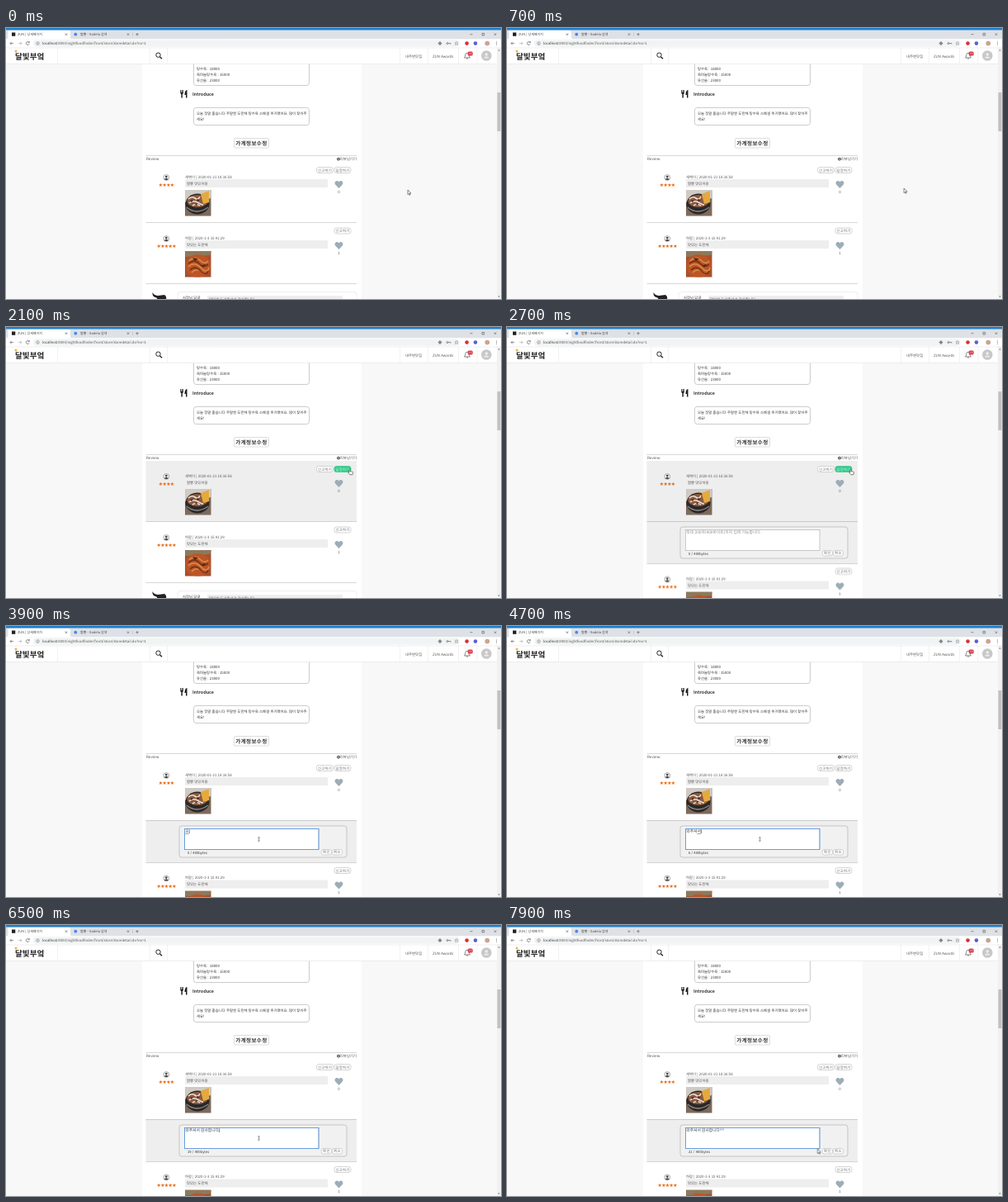
Recreate the animation shown at these times as an HTML page. Size 600x328 px, loop 8 s.

```html
<!DOCTYPE html>
<html lang="ko">
<head>
<meta charset="utf-8">
<title>상세페이지</title>
<style>
html, body { margin: 0; width: 100%; height: 100%; overflow: hidden; background: #fff; }
svg { display: block; width: 100vw; height: 100vh; }
text { font: 4.4px "Noto Sans CJK KR", "Noto Sans CJK", "Noto Sans", sans-serif; fill: #555; text-rendering: geometricPrecision; white-space: pre; }
.dark { fill: #333; }
.mid { text-anchor: middle; }
.tab { font-size: 4px; fill: #444; }
.label { text-anchor: middle; letter-spacing: .25px; fill: #666; }
.logo { font-size: 9.6px; font-weight: 700; fill: #222; }
.star { font: 6px "DejaVu Sans", sans-serif; letter-spacing: -.7px; fill: #e8670c; text-anchor: middle; }
.line { fill: none; stroke: #b0b0b0; stroke-width: .5; }
.box { fill: #fff; stroke: #999; stroke-width: .5; }
.icon { fill: none; stroke: #5f6368; stroke-width: .7; }

.hover, .press, .form, .focus, .tail, .pointer, .arrow, .hand, .beam {
  animation: 8s step-end infinite;
}
.hover { animation-name: hover; }
.press { animation-name: press; }
.form { animation-name: form; }
.focus { animation-name: focus; }
.tail { animation-name: tail; }
.arrow { animation-name: arrow; }
.hand { animation-name: press; }
.beam { animation-name: beam; }
.pointer { animation-name: move; animation-timing-function: ease-in-out; }
@keyframes hover { 0%, 40.3%, 100% { opacity: 0 } 21.2% { opacity: 1 } }
@keyframes press { 0%, 36.6%, 100% { opacity: 0 } 24% { opacity: 1 } }
@keyframes form { 0% { opacity: 0 } 32%, 100% { opacity: 1 } }
@keyframes focus { 0% { opacity: 0 } 44.5%, 100% { opacity: 1 } }
@keyframes tail { 0% { transform: none } 32%, 100% { transform: translateY(50.5px) } }
@keyframes arrow { 0%, 36.6%, 97%, 100% { opacity: 1 } 24%, 42% { opacity: 0 } }
@keyframes beam { 0%, 97%, 100% { opacity: 0 } 42% { opacity: 1 } }
@keyframes move {
  0%, 6% { transform: translate(487px, 196px) }
  17.5% { transform: translate(438px, 179px) }
  25%, 35.5% { transform: translate(416px, 172px) }
  44%, 91.25% { transform: translate(306.5px, 258px) }
  98.5%, 100% { transform: translate(376.5px, 271px) }
}
</style>
</head>
<body>
<svg viewBox="0 0 600 328" preserveAspectRatio="none">
  <defs>
    <g id="person">
      <circle r="3.4" fill="#fff" stroke="#555" stroke-width=".5"/>
      <circle cy="-.9" r="1.4" fill="#444"/>
      <path d="M-2.5 2.2Q-2 .7 0 .7T2.5 2.2Q0 3.8 -2.5 2.2Z" fill="#444"/>
    </g>
    <path id="heart" d="M0 4.6L-4.1 .5C-6 -1.7 -4.4 -4.2 -2.3 -4.2Q-.8 -4.2 0 -2.8Q.8 -4.2 2.3 -4.2C4.4 -4.2 6 -1.7 4.1 .5Z" fill="#9dadb6"/>
    <rect id="pill" width="20" height="7" rx="2.6" class="box" style="stroke:#aaa"/>
    <rect id="key" width="12" height="6.5" rx="2" class="box" style="stroke:#aaa"/>
    <path id="close" d="M-1.2 -1.2L1.2 1.2M1.2 -1.2L-1.2 1.2" class="icon"/>
    <clipPath id="photo"><rect width="31.5" height="31.5"/></clipPath>
  </defs>

  <!-- page -->
  <rect width="600" height="328" fill="#f8f8f8"/>
  <rect x="165" y="43" width="266" height="285" fill="#fff"/>

  <rect x="227.5" y="30" width="140" height="39.5" rx="3" class="box"/>
  <text class="dark" x="231" y="50.5">탕수육 : 18000</text>
  <text class="dark" x="231" y="57.5">육마늘탕수육 : 15000</text>
  <text class="dark" x="231" y="64.5">유산슬 : 23000</text>
  <g fill="#222">
    <path d="M211.3 75h.8v2.8h.6V75h.8v2.8h.6V75h.8v3.4q0 1.2-1 1.5v4.6h-1.5v-4.6q-1.1-.3-1.1-1.5Z"/>
    <path d="M219.5 75v9.5H218v-3.6h-1.5Q216.5 75.6 219.5 75Z"/>
  </g>
  <text class="dark" x="226" y="82" style="font-size:5.4px;font-weight:700">Introduce</text>
  <rect x="227.5" y="96.5" width="140" height="21" rx="3" class="box"/>
  <text class="dark" x="231" y="105.3">오늘 정말 춥습니다 주말엔 도란채 탕수육 스페셜 추가했어요. 많이 찾아주</text>
  <text class="dark" x="231" y="112.3">세요!</text>
  <rect x="276.5" y="133.5" width="42" height="11.5" rx="1" class="box" style="stroke:#bbb"/>
  <text class="dark mid" x="297.4" y="141.7" style="font-size:6.6px;font-weight:700;letter-spacing:.3px">가계정보수정</text>

  <path d="M169.5 154.5H425" class="line"/>
  <text x="170" y="160.2" style="font-size:4.6px">Review</text>
  <circle cx="403" cy="158.6" r="1.9" fill="#444"/>
  <path d="M402 158.600h2M403 157.600v2" stroke="#fff" stroke-width=".5"/>
  <text x="425" y="160.2" text-anchor="end">리뷰남기기</text>

  <!-- first review -->
  <rect class="hover" x="169.5" y="162" width="255.5" height="73.500" fill="#eee"/>
  <use href="#pill" x="376.5" y="168.5"/>
  <text class="label" x="386.6" y="173.6">신고하기</text>
  <use href="#pill" x="398" y="168.5"/>
  <text class="label" x="408.1" y="173.6">답장하기</text>
  <g class="press">
    <rect x="398" y="168.5" width="20" height="7" rx="2.6" fill="#2fcb8b" stroke="#2fcb8b" stroke-width=".5"/>
    <text class="label" x="408.1" y="173.6" style="fill:#d5f7e8">답장하기</text>
  </g>
  <use href="#person" x="194.3" y="181"/>
  <text class="star" x="194.2" y="192.1">★★★★</text>
  <text x="217" y="181.7">새벽이 | 2020-01-21 18:16:58</text>
  <rect x="217" y="183" width="173" height="10" fill="#eee"/>
  <text x="219" y="189.7">짬뽕 맛있어용</text>
  <g transform="translate(217 196)" clip-path="url(#photo)">
    <rect width="32" height="32" fill="#7d6a5c"/>
    <path d="M0 0H32V10L0 15Z" fill="#cfcac4"/>
    <ellipse cx="15" cy="17" rx="14.5" ry="12.5" fill="#2b2827"/>
    <ellipse cx="15" cy="13.5" rx="12.5" ry="7.500" fill="#8d5a40"/>
    <path d="M19 5L29 1V15L22 17Z" fill="#e5aa3d"/>
    <path d="M4 11Q8 7 12 10T18 8M5 16Q10 12 15 15T22 18M9 19Q13 16 18 19" fill="none" stroke="#eadfd2" stroke-width="1.6"/>
    <path d="M6 13L10 12L8 15ZM14 11L18 12L15 14ZM12 17L15 16L14 19Z" fill="#3b2520"/>
    <path d="M2 21Q14 31 28 21" fill="none" stroke="#8b8886" stroke-width="1.3"/>
  </g>
  <use href="#heart" x="403.5" y="189.3"/>
  <text class="mid" x="403.5" y="199.9">0</text>
  <path d="M169.5 235.5H425" class="line"/>

  <!-- reply form -->
  <g class="form">
    <rect x="169.5" y="235.5" width="255.5" height="51" fill="#eee"/>
    <path d="M169.5 235.5H425M169.5 286.5H425" class="line"/>
    <rect x="210" y="242" width="203" height="38" rx="3" class="box" style="fill:#f1f1f1"/>
    <rect x="216.5" y="245.5" width="162.5" height="25" class="box"/>
    <rect class="focus" x="216.5" y="245.5" width="162.5" height="25" fill="none" stroke="#5e9ae0" stroke-width=".9"/>
    <text id="hint" x="217.3" y="250" style="font-size:4.8px;fill:#888">최대 200자(400바이트)까지 입력 가능합니다.</text>
    <text class="dark" x="217.3" y="250" style="font-size:4.75px"><tspan id="done"></tspan><tspan id="live" text-decoration="underline"></tspan></text>
    <rect id="caret" y="246.3" width=".5" height="4.7" fill="#111"/>
    <text id="count" class="dark" x="220" y="275.6" style="font-size:4.2px"></text>
    <use href="#key" x="382.3" y="270.5"/>
    <text class="label" x="388.4" y="275.3">확인</text>
    <use href="#key" x="395.5" y="270.5"/>
    <text class="label" x="401.6" y="275.3">취소</text>
  </g>

  <!-- later reviews -->
  <g class="tail">
    <use href="#pill" x="398" y="242"/>
    <text class="label" x="408.1" y="247.2">신고하기</text>
    <use href="#person" x="194.3" y="255"/>
    <text class="star" x="194.2" y="266.1">★★★★★</text>
    <text x="217" y="255.7">하람 | 2020-1-3 15:41:29</text>
    <rect x="217" y="257" width="173" height="10" fill="#eee"/>
    <text x="219" y="263.7">맛있는 도란채</text>
    <g transform="translate(217 270)" clip-path="url(#photo)">
      <rect width="32" height="32" fill="#a8502c"/>
      <path d="M0 0H32L30 5L0 7Z" fill="#8c7a5c"/>
      <ellipse cx="15.5" cy="18" rx="15" ry="14" fill="#bd5526"/>
      <path d="M5 12Q12 5 18 11T28 12M4 19Q11 12 19 20T29 20M8 26Q15 19 23 27" fill="none" stroke="#d98f4a" stroke-width="1.500"/>
      <path d="M4 15Q12 9 17 15T28 16M6 23Q12 17 19 24T28 24" fill="none" stroke="#7b3117" stroke-width="1.700"/>
      <path d="M9 8L16 9L12 12ZM20 17L25 16L22 20Z" fill="#4f2818"/>
    </g>
    <use href="#heart" x="403.5" y="263.3"/>
    <text class="mid" x="403.5" y="273.9">1</text>
    <path d="M169.5 309.5H425" class="line"/>
    <path d="M177.5 320Q179 323.500 184 324L192 323Q195 324.500 194 329H183Q184 326.500 181 326Q177 325 177.500 320Z" fill="#222"/>
    <rect x="208" y="319.5" width="217" height="30" rx="3" class="box" style="stroke:#ddd"/>
    <text class="dark" x="214" y="327.8">사장님 답글</text>
    <rect x="244" y="324" width="164" height="10" fill="#eee"/>
    <text x="246" y="329.5">맛있게 드셔주셔서 감사합니다</text>
  </g>

  <!-- site header -->
  <rect y="24" width="600" height="19.500" fill="#fff"/>
  <path d="M0 43.5H595" class="line" style="stroke:#ddd"/>
  <path d="M62.5 24V43M174.5 24V43M195.500 24V43M477.500 24V43M511.500 24V43M548.500 24V43M571 24V43" class="line" style="stroke:#e4e4e4"/>
  <circle cx="12" cy="28" r="1.5" fill="#e6b640"/>
  <text class="logo" x="11" y="37.5">달빛부엌</text>
  <path d="M186.6 35L189 37.3" stroke="#222" stroke-width="1.4"/>
  <circle cx="184.5" cy="32.7" r="2.7" fill="none" stroke="#222" stroke-width="1"/>
  <text x="484" y="35.5">내주변맛집</text>
  <text x="517" y="35.5">ZUN Awards</text>
  <path d="M555.5 36Q556.8 35 556.8 32.5Q557 30.3 559 30.3T561.2 32.5Q561.2 35 562.5 36ZM558 37h2" fill="none" stroke="#555" stroke-width=".7"/>
  <rect x="559.7" y="28.6" width="6" height="5" rx="1.5" fill="#dc3545"/>
  <text class="mid" x="562.7" y="32.4" style="font-size:3.3px;fill:#fff">16</text>
  <circle cx="582.3" cy="33.5" r="6.3" fill="#c8c8c8"/>
  <circle cx="582.3" cy="32" r="1.7" fill="#eee"/>
  <path d="M579.2 36.600Q579.5 34.400 582.300 34.400T585.400 36.600Z" fill="#eee"/>

  <rect x="595" y="24" width="5" height="304" fill="#f1f1f1"/>
  <rect x="595.5" y="78" width="4" height="47" fill="#c1c1c1"/>
  <path d="M596.3 27.5l1.2-1.4 1.2 1.4ZM596.3 324.5l1.2 1.4 1.2-1.4Z" fill="#666"/>

  <!-- browser -->
  <rect width="600" height="14" fill="#dee1e6"/>
  <rect width="600" height="2.5" fill="#1e7fcb"/>
  <path d="M1 13.5Q2.5 13 2.5 11V4.500Q2.500 3 4.500 3H76Q78 3 78 4.500V11Q78 13 80 13.500Z" fill="#fff"/>
  <rect x="7" y="5.5" width="4.3" height="4.3" fill="#222"/>
  <text class="tab" x="14" y="9.2">ZUN | 상세페이지</text>
  <circle cx="84.3" cy="7.7" r="1.9" fill="#4285f4"/>
  <text class="tab" x="90" y="9.2">짬뽕 - Sodela 검색</text>
  <use href="#close" x="73" y="7.7"/>
  <use href="#close" x="148" y="7.7"/>
  <path d="M153.5 5.5v4.5" class="line"/>
  <path d="M157.300 7.700h3.400M159 6v3.400M562.500 7.700h3M577 6.400h2.600v2.600h-2.600Z" class="icon"/>
  <use href="#close" x="593" y="7.7"/>
  <rect y="13.3" width="600" height="10.7" fill="#fff"/>
  <path d="M0 24H600" class="line" style="stroke:#ddd"/>
  <rect x="33" y="14.5" width="517" height="8.2" rx="4.1" fill="#f1f3f4"/>
  <path d="M9 18.6H5M6.8 16.8L5 18.6L6.8 20.4" class="icon"/>
  <path d="M15 18.6H19M17.2 16.8L19 18.6L17.2 20.4" class="icon" opacity=".5"/>
  <path d="M28 17.4A2 2 0 1 0 28.2 19.3M28.3 16V17.7H26.6" class="icon"/>
  <circle cx="38.5" cy="18.6" r="1.8" class="icon" style="stroke-width:.5"/>
  <path d="M38.5 18.3v1.2M38.5 17.3v.4" class="icon" style="stroke-width:.5"/>
  <text x="44" y="20.2" style="font-size:4.25px"><tspan class="dark">localhost</tspan>:8000/nightfoodfinder/front/store/storedetail.do?no=1</text>
  <circle cx="526" cy="18.6" r="1.5" class="icon"/>
  <path d="M523.7 18.6h4.600M526 16.300v4.600M534 18.600a1 1 0 1 0 2 0a1 1 0 1 0-2 0M536 18.600h3v1" class="icon"/>
  <path d="M546 16.5l.6 1.4 1.5.1-1.1 1 .4 1.5-1.4-.8-1.4.8 .4-1.5-1.1-1 1.5-.1Z" class="icon" style="stroke-width:.4"/>
  <circle cx="558.6" cy="18.6" r="2.3" fill="#d9303a"/>
  <circle cx="569" cy="18.6" r="2.3" fill="#5661d4"/>
  <circle cx="583.3" cy="18.6" r="2.900" fill="#c9a593"/>
  <path d="M594.5 16.5v.8M594.5 18.2v.8M594.5 19.9v.8" class="icon" style="stroke-width:.9"/>

  <!-- pointer -->
  <g class="pointer">
    <path class="arrow" d="M0 0V5.6L1.3 4.4L2.1 6.3L3 5.9L2.2 4.1H3.9Z" fill="#fff" stroke="#111" stroke-width=".5"/>
    <path class="hand" d="M0 .5Q.7 -.3 1.2 .5V2.7L4.2 3.3Q4.7 3.5 4.6 4.2L4 6.7H.8L-1.2 4.1Q-1 3.3 0 4Z" fill="#fff" stroke="#111" stroke-width=".5"/>
    <path class="beam" d="M-1 -2.5Q0 -2.5 0 -2T1 -2.5M0 -2V2M-1 2.5Q0 2.5 0 2T1 2.5" fill="none" stroke="#222" stroke-width=".6"/>
  </g>
</svg>
<script>
// [time, committed text, syllable still being composed]
const keys = [
  [0, "", ""], [3700, "", "ㅇ"], [3850, "", "오"], [3980, "", "와"],
  [4080, "와", "ㅈ"], [4180, "와", "주"], [4280, "와주", "ㅅ"], [4380, "와주", "셔"],
  [4500, "와주셔", "ㅅ"], [4620, "와주셔", "서"], [4850, "와주셔서 ", ""],
  [5000, "와주셔서 ", "ㄱ"], [5100, "와주셔서 ", "가"], [5200, "와주셔서 ", "감"],
  [5300, "와주셔서 감", "사"], [5520, "와주셔서 감사", "하"], [5640, "와주셔서 감사", "합"],
  [5780, "와주셔서 감사합", "니"], [5950, "와주셔서 감사합니", "ㄷ"],
  [6100, "와주셔서 감사합니", "다"], [6400, "와주셔서 감사합니다", ""],
  [6800, "와주셔서 감사합니다^", ""], [7000, "와주셔서 감사합니다^^", ""]
];
const [hint, done, live, caret, count] =
  ["hint", "done", "live", "caret", "count"].map(id => document.getElementById(id));
const bytes = s => [...s].reduce((n, c) => n + (c > "\x7f" ? 2 : 1), 0);
const start = performance.now();
let shown;

function draw() {
  const t = (performance.now() - start) % 8000;
  const key = keys.findLast(k => k[0] <= t);
  if (key !== shown) {
    shown = key;
    const [, text, part] = key;
    done.textContent = text;
    live.textContent = part;
    hint.style.opacity = text || part ? 0 : 1;
    count.textContent = bytes(text) + " / 400bytes";
    caret.setAttribute("x", 217.5 + done.parentNode.getComputedTextLength());
  }
  const since = t - Math.max(key[0], 3560);
  caret.style.opacity = since >= 0 && since % 1000 < 500 ? 1 : 0;
  requestAnimationFrame(draw);
}
draw();
</script>
</body>
</html>
```
